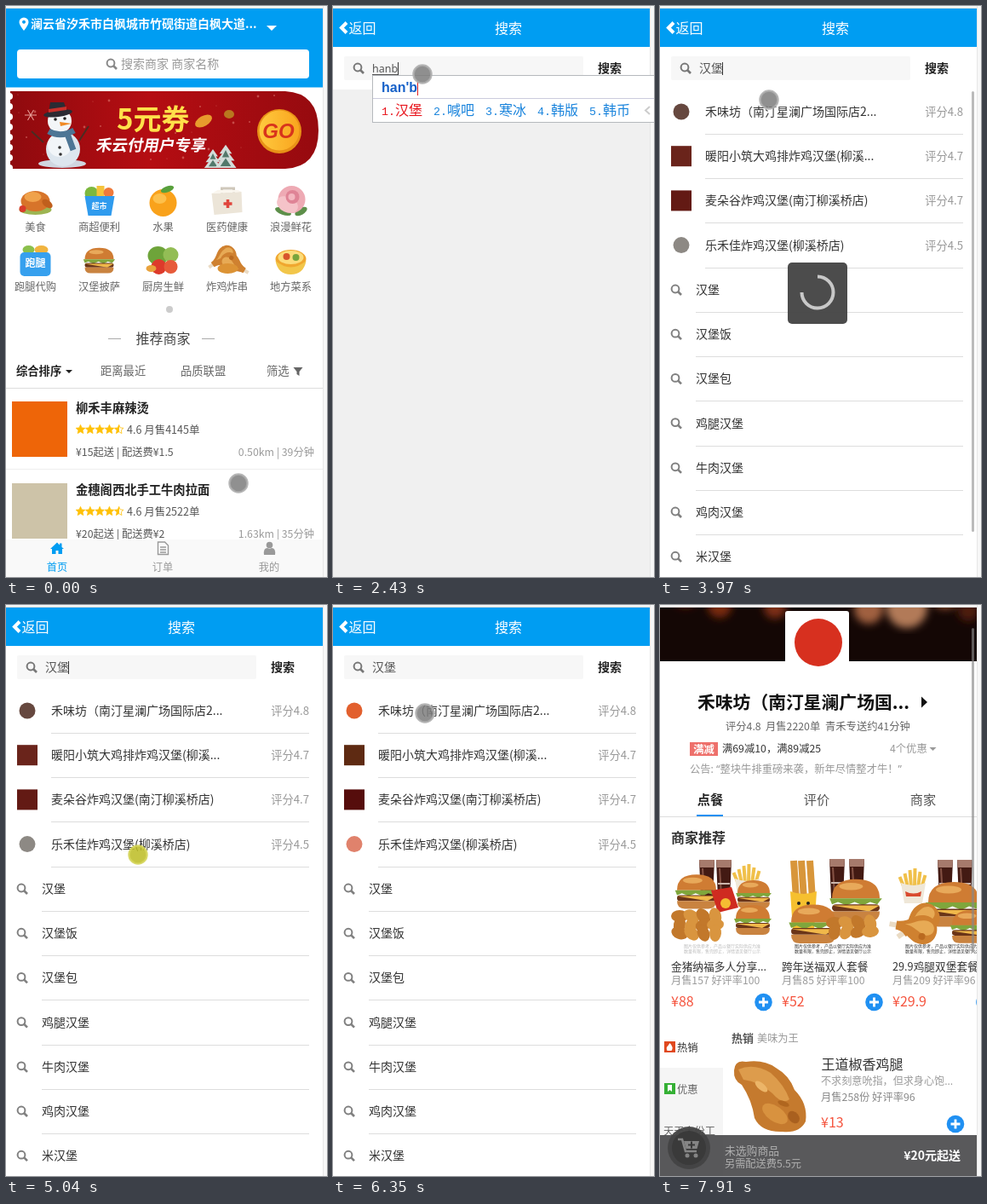
An HTML page for the animation above (7990 ms loop, 377 by 670 pixels).

```html
<!DOCTYPE html>
<html lang="zh-CN">
<head>
<meta charset="utf-8">
<style>
html, body { margin: 0; width: 100%; height: 100%; overflow: hidden; background: #fff; }
svg { display: block; width: 377px; height: 670px; font-family: "Noto Sans CJK SC", "Noto Sans CJK", "Noto Sans", sans-serif; }
.latin { font-family: "Noto Sans", "Noto Sans CJK SC", sans-serif; }
.arial { font-family: "Liberation Sans", sans-serif; }
.mono { font-family: "Liberation Mono", monospace; }
</style>
</head>
<body>
<svg id="stage" viewBox="0 0 377 670"></svg>
<script>
const LOOP = 7990, TICK = LOOP / 104;
const BLUE = '#009df2', BOLD = 'font-weight="700"', MID = 'text-anchor="middle"', END = 'text-anchor="end"';
const $ = id => document.getElementById(id);

// Drawing helpers
const text = (x, y, size, fill, str, more = '') => `<text x="${x}" y="${y}" font-size="${size}" fill="${fill}" ${more}>${str}</text>`;
const rect = (x, y, w, h, fill, more = '') => `<rect x="${x}" y="${y}" width="${w}" height="${h}" fill="${fill}" ${more}/>`;
const circle = (x, y, r, fill, more = '') => `<circle cx="${x}" cy="${y}" r="${r}" fill="${fill}" ${more}/>`;
const oval = (x, y, rx, ry, fill, turn = 0) => `<ellipse rx="${rx}" ry="${ry}" fill="${fill}" transform="translate(${x} ${y}) rotate(${turn})"/>`;
const path = (d, fill, more = '') => `<path d="${d}" fill="${fill}" ${more}/>`;
const line = (d, color, width, more = '') => path(d, 'none', `stroke="${color}" stroke-width="${width}" ${more}`);
const group = (id, body, more = '') => `<g id="${id}" ${more}>${body}</g>`;
const at = (x, y, body, scale = 1) => `<g transform="translate(${x} ${y}) scale(${scale})">${body}</g>`;
const each = (list, fn) => list.map(fn).join('');

const magnifier = (x, y, color) => circle(x - 1, y - 1, 4.4, 'none', `stroke="${color}" stroke-width="2"`) + line(`M${x + 2} ${y + 2}l4 4`, color, 2.6);
const down = (x, y, w, color) => path(`M${x - w / 2} ${y}h${w}l${-w / 2} ${w / 2}z`, color);
const plus = (x, y) => circle(x, y, 10.3, '#2090f2') + line(`M${x - 5.5} ${y}h11M${x} ${y - 5.5}v11`, '#fff', 2.8);
const back = (x, y, s) => line(`M${x + s} ${y - s}l${-s} ${s}l${s} ${s}`, '#fff', 4);

function star(x, y, fill) {
  const points = Array.from({ length: 10 }, (_, i) => {
    const r = i % 2 ? 2.6 : 5.6, a = i * Math.PI / 5;
    return [x + r * Math.sin(a), y - r * Math.cos(a)].map(v => v.toFixed(1));
  });
  return `<polygon points="${points.join(' ')}" fill="${fill}" stroke="#ffc107" stroke-width=".8"/>`;
}

// Food
const burger = (x, y, s) => at(x, y, path('M-20 -2Q-20 -18 0 -18T20 -2z', '#cf7c33') + oval(-4, -12, 10, 3, '#e8a95a') +
  path('M-22 -2h44l-4 5l-6 -2l-6 3l-7 -3l-7 3l-7 -3l-5 2z', '#7fa63c') + rect(-20, 3, 40, 6, '#6b3518', 'rx="3"') +
  path('M-20 4h40l-9 5z', '#f0b84a') + path('M-20 9h40q0 8 -8 8h-24q-8 0 -8 -8', '#c98340'), s);
const cola = (x, y) => at(x, y, path('M-9 -24h18l-2 46h-14z', '#431a13') + path('M-9 -24h18l-.6 9h-16.8z', '#a67a6c') +
  line('M-5 -14l2 32', '#855244', 2) + line('M-7 4h14', '#cbb5ac', 2));
const fries = (x, y) => at(x, y, each([-11, -7, -3, 1, 5, 9], i => line(`M${i} 4L${i * 1.5} ${-20 + Math.abs(i)}`, '#f0c04a', 4)) +
  path('M-15 -2q15 6 29 0l-4 24h-21z', '#efe7d8') + path('M-10 8q10 5 19 0l-1 6h-17z', '#d94a2f'));
const nuggets = (x, y, n) => at(x, y, each([...Array(n).keys()], i => oval((i % 4) * 14 - 20, (i >> 2) * 10, 10, 7, i % 2 ? '#d9953f' : '#c2782b', i * 25)));
const drum = (x, y, s, turn) => `<g transform="translate(${x} ${y}) rotate(${turn}) scale(${s})">` +
  line('M0 14V34', '#eadbc4', 6) + path('M-17 -6C-17 -28 17 -28 17 -6C17 8 6 10 5 26H-5C-6 10 -17 8 -17 -6', '#cf8130') +
  path('M-11 -8C-11 -22 6 -22 6 -10C4 0 -2 4 -3 16C-6 4 -11 2 -11 -8', '#e7aa55') + circle(8, -6, 4, '#ba6a20') + '</g>';
const friedLeg = path('M87 583Q88 570 101 573Q122 570 136 580Q152 589 158 606Q174 622 171 643Q164 657 144 655Q119 656 111 639Q108 618 96 600Q86 595 87 583', '#c57a2e') +
  path('M92 582Q110 574 130 586Q146 600 152 617Q144 624 132 610Q116 596 98 594z', '#dd9c4c') +
  oval(135, 634, 17, 9, '#d8923f', 35) + oval(157, 638, 8, 6, '#a9601f', 50) + oval(119, 602, 9, 4, '#ecb568', 40) + oval(145, 622, 7, 3, '#b0661f', 20);

const foodIcons = [
  ['美食', oval(0, 10, 19, 6, '#9db552') + oval(0, 0, 17, 12, '#d7742a') + oval(-3, -5, 10, 6, '#f0a24b') + oval(14, 3, 7, 4, '#c05f1c', 35) + circle(-15, 9, 4, '#d93c2b')],
  ['商超便利', oval(-9, -9, 8, 8, '#7cb83f') + rect(-3, -18, 9, 14, '#f5c33b') + circle(11, -10, 6, '#ef7a3b') + path('M-17 -6H18L14 17H-13z', '#2f9bee') + text(0, 9, 9, '#fff', '超市', MID + BOLD)],
  ['水果', circle(0, 2, 16, '#f9a21b') + oval(-4, -3, 8, 6, '#fdc04b') + oval(5, -14, 8, 3.5, '#58a03c', -20)],
  ['医药健康', line('M-6 -9v-6h14v6', '#cfc8bb', 3) + path('M-18 -9L17 -11L18 13L-15 16z', '#ece5d8') + path('M-18 -9l7 -4h24l4 2z', '#faf6ee') + line('M-4 3h10M1 -2v10', '#e0453c', 3.5)],
  ['浪漫鲜花', oval(-9, 12, 10, 4, '#5d8f4a', 20) + oval(12, 12, 8, 4, '#5d8f4a', -30) + circle(1, -2, 16, '#eeaab4') + oval(-4, 4, 13, 9, '#f5c3c9', 25) + circle(2, -5, 8, '#df8496') + circle(1, -5, 4, '#f3b7c0')],
  ['跑腿代购', oval(-8, -13, 7, 5, '#8bc04c') + oval(7, -13, 8, 5, '#f1b43f') + rect(-18, -10, 36, 28, '#36a0ee', 'rx="5"') + text(0, 7, 12, '#fff', '跑腿', MID + BOLD)],
  ['汉堡披萨', burger(0, 0, .85)],
  ['厨房生鲜', oval(-6, -6, 12, 11, '#6ea43a') + oval(9, -7, 9, 9, '#93bd55') + circle(-5, 7, 9, '#dd3a2b') + circle(9, 7, 8, '#e75a3a') + oval(-14, 9, 6, 4, '#e9a33d')],
  ['炸鸡炸串', drum(-3, -5, .65, 55) + drum(6, 3, .65, -60) + oval(1, 9, 12, 6, '#dc9335')],
  ['地方菜系', oval(0, -2, 18, 11, '#f0a72f') + oval(0, -4, 15, 8, '#fbdc7b') + circle(-5, -5, 4, '#d8542c') + circle(6, -4, 4, '#79a53c') + path('M-18 0Q0 15 18 0Q15 16 0 16T-18 0', '#f2c64a')],
];

// Home page
const banner = () => path('M5 100H328Q367 102 367 145.500T328 191H5z', 'url(#red)') +
  each([...Array(8).keys()], i => circle(4, 106 + i * 12, 4, '#fff')) +
  each([...Array(34).keys()], i => circle(14 + i * 97 % 320, 104 + i * 37 % 80, .6 + i % 3 * .4, '#e78b80', 'opacity=".5"')) +
  each([0, 60, 120], a => `<path d="M22 128h14" stroke="#e9a49c" transform="rotate(${a} 29 128)"/>`) +
  oval(66, 185, 28, 5, '#d0d6e0') + circle(67, 168, 20, '#dde6ee') + circle(63, 163, 14, '#f1f5f8') + circle(63, 135, 14, '#f3f6f8') +
  line('M44 160L30 147M86 158L97 141', '#4a2c22', 2) + oval(61, 126, 17, 4, '#2b2b33', -8) + path('M50 125l2 -12h16l4 11z', '#2b2b33') + path('M50 121l21 -3v4l-21 3z', '#c9302b') +
  circle(58, 133, 1.8, '#222') + circle(69, 132, 1.8, '#222') + path('M63 136l14 2l-13 3z', '#f08a24') +
  line('M50 147Q64 155 80 146M72 150l7 19', '#4d7695', 7) + circle(63, 166, 1.8, '#333') + circle(64, 174, 1.8, '#333') +
  text(130, 145, 33, '#ffe04a', '5元券', BOLD) + text(105, 170, 18.5, '#fff', '禾云付用户专享', BOLD + ' transform="skewX(-10)" transform-origin="105 170"') +
  oval(232, 135, 11, 6, '#e89b2d', -30) + oval(262, 127, 6, 5, '#b9781f') +
  each([[243, 190, .85], [258, 190, 1.05]], ([x, y, s]) => at(x, y, path('M0 -26l7 10h-3l6 8h-4l6 8h-24l6 -8h-4l6 -8h-3z', '#d3dcd9') + path('M0 -20l4 8h-8zM0 -11l6 9h-12z', '#53786b'), s)) +
  circle(321, 147, 26, '#e89117') + circle(321, 146, 23.5, 'url(#gold)') + text(320, 155, 24, '#d8341c', 'GO', `${MID} ${BOLD} class="arial" font-style="italic"`);

const shop = (y, color, name, sales, fee, distance) => rect(7, y, 65, 65, color) + text(82, y + 13, 14.3, '#222', name, BOLD) +
  each([0, 1, 2, 3, 4], i => star(87.5 + i * 11.3, y + 33, i < 4 ? '#ffc107' : 'url(#half)')) +
  text(142, y + 38, 12.5, '#555', `4.6 月售${sales}单`) + text(82, y + 63.5, 12.3, '#555', fee) + text(362, y + 63.5, 12.3, '#999', distance, END);

const home = rect(0, 3, 372, 667, '#fff') + rect(0, 3, 372, 92.5, BLUE) +
  path('M21 29Q15.500 22 15.500 19A5.500 5.500 0 0 1 26.500 19Q26.500 22 21 29M21 16.800a2 2 0 1 0 .01 0', '#fff', 'fill-rule="evenodd"') +
  text(29, 26, 14, '#fff', '澜云省汐禾市白枫城市竹砚街道白枫大道...', BOLD) + down(312, 23, 12, '#fff') +
  rect(13, 51, 343, 34, '#fff', 'rx="4"') + magnifier(124, 68, '#888') + text(135, 73, 14, '#999', '搜索商家 商家名称') + banner() +
  each(foodIcons, ([label, art], i) => {
    const x = 34.5 + i % 5 * 75, y = i < 5 ? 229 : 299;
    return at(x, y, art) + text(x, y + 34.5, 12.3, '#666', label, MID);
  }) +
  circle(192, 356, 4, '#ccc') + text(184.5, 396, 16, '#444', '推荐商家', MID) + line('M120 390.500h15M230 390.500h15', '#aaa', 1) +
  text(12, 433, 13.3, '#222', '综合排序', BOLD) + down(74, 427, 8, '#222') + text(111, 433, 13.3, '#666', '距离最近') + text(205, 433, 13.3, '#666', '品质联盟') +
  text(306, 433, 13.3, '#666', '筛选') + path('M337.500 424h11l-4 5v5l-3 -2v-3z', '#666') + rect(0, 448, 372, 1, '#ddd') +
  shop(464, '#ee6508', '柳禾丰麻辣烫', 4145, '¥15起送 | 配送费¥1.5', '0.50km | 39分钟') + rect(0, 543, 372, 1, '#eee') +
  shop(560, '#cdc3a8', '金穗阁西北手工牛肉拉面', 2522, '¥20起送 | 配送费¥2', '1.63km | 35分钟') +
  rect(0, 626, 372, 44, '#f9f9f9') + path('M52 637l8 -7.500l3 3v-2h2.500v4.500l2.500 2h-2v6h-4.500v-4h-3v4h-4.500v-6z', BLUE) +
  line('M178.500 629h8l4 4v10.500h-12zM181 635h7M181 638h7M181 641h7', '#999', 1.4) + circle(309.5, 632.500, 3.800, '#999') + path('M303 644q-1 -8 4 -8q2.500 1.500 5 0q5 0 4 8z', '#999') +
  text(60, 663, 12.2, BLUE, '首页', MID) + text(184, 663, 12.2, '#999', '订单', MID) + text(309, 663, 12.2, '#999', '我的', MID);

// Search page
const ROW = 52.2;
const stores = [['禾味坊（南汀星澜广场国际店2...', 4.8], ['暖阳小筑大鸡排炸鸡汉堡(柳溪...', 4.7], ['麦朵谷炸鸡汉堡(南汀柳溪桥店)', 4.7], ['乐禾佳炸鸡汉堡(柳溪桥店)', 4.5]];
const words = ['汉堡', '汉堡饭', '汉堡包', '鸡腿汉堡', '牛肉汉堡', '鸡肉汉堡', '米汉堡', '香辣汉堡'];
const logos = colors => each(colors, (c, i) => i % 3 ? rect(13, 112 + i * ROW, 24, 24, c) : circle(25, 124 + i * ROW, 9.5, c));

const list = rect(0, 98, 372, 700, '#fff') +
  group('dull', logos(['#66483f', '#6a241b', '#631a14', '#8d8984'])) + group('vivid', logos(['#e2602e', '#5e2a12', '#560d0c', '#e0826c'])) +
  each(stores, ([name, score], i) => text(53, 129 + i * ROW, 14, '#333', name) + text(356, 129 + i * ROW, 13.2, '#999', '评分' + score, END) + rect(53, Math.round(150 + i * ROW), 303, 1, '#ddd')) +
  each(words, (w, i) => magnifier(19, 333 + i * ROW, '#808080') + text(42, 338 + i * ROW, 14, '#333', w) + rect(42, Math.round(359 + i * ROW), 314, 1, '#ddd'));

const search = rect(0, 3, 372, 667, '#f0f0f0') + rect(0, 3, 372, 45, BLUE) + back(10, 25.5, 6) + text(18.5, 32, 16, '#fff', '返回') + text(206, 32, 16, '#fff', '搜索', MID) +
  rect(0, 48, 372, 50, '#fff') + rect(13, 59, 281, 28, '#f7f7f7', 'rx="2"') + magnifier(30, 73, '#777') + text(311, 78, 14, '#222', '搜索', BOLD) +
  group('results', `<g clip-path="url(#listArea)">${group('list', list)}</g>` + rect(366, 100, 3, 517, '#bbb', 'id="listBar" rx="1.5"')) +
  text(46, 78, 14, '#555', '', 'id="query"') + rect(46, 80, 0, 1, '#555', 'id="underline"') + rect(46, 66, 1, 15, '#333', 'id="caret"');

const ime = rect(46.5, 81.5, 340, 55, '#fff', 'stroke="#b5b9bd"') + rect(47, 108, 330, 1, '#ccd') +
  text(57, 101, 16, '#1560c8', '', `id="pinyin" class="arial" ${BOLD}`) + rect(100, 87, 1, 18, '#e02020', 'id="imeCaret"') +
  each([0, 1, 2, 3, 4], i => {
    const x = 57 + i * 61, color = i ? '#1883dc' : '#e8141c';
    return text(x, 128, 13.3, color, `${i + 1}.`, 'class="mono"') + text(x + 16, 128, 16, color, '', `id="word${i}" font-weight="300"`);
  }) + line('M372 118l-5 4.500l5 4.500', '#ccc', 2);

const typing = [
  [2190, 'ha', 'ha', '哈 蛤 铪 嘿 呵'], [2260, 'han', 'han', '汉 喊 韩 寒 含'], [2430, 'hanb', "han'b", '汉堡 喊吧 寒冰 韩版 韩币'],
  [2500, 'hanba', "han'ba", '喊吧 汉堡 汗吧 旱坝 寒坝'], [2580, 'hanbao', "han'bao", '汉堡 憨包 含苞 韩宝 寒豹'],
];

// Shop page
const meals = [
  ['金猪纳福多人分享...', '月售157 好评率100', '¥88', cola(42, 33) + cola(62, 33) + burger(30, 47, 1.15) + fries(90, 33) + burger(97, 50, .95) + burger(96, 80, 1) + at(61, 60, path('M-14 -15l24 -4l8 24l-24 6z', '#cf2b20') + circle(3, 0, 6, '#f5bd32')) + nuggets(30, 75, 12), '#bbb'],
  ['跨年送福双人套餐', '月售85 好评率100', '¥52', cola(65, 32) + cola(88, 32) + each([14, 23, 33], x => line(`M${x} 10l3 45`, '#d8963a', 8)) + path('M10 46q16 6 31 0l-3 46h-25z', '#f6c02f') + circle(20, 60, 2, '#222') + circle(31, 60, 2, '#222') + path('M22 66h8l-4 7z', '#d73a22') + burger(87, 57, 1.4) + burger(37, 85, 1.3) + nuggets(82, 83, 8), '#333'],
  ['29.9鸡腿双堡套餐', '月售209 好评率96', '¥29.9', cola(62, 33) + cola(85, 33) + fries(25, 38) + burger(72, 62, 1.5) + drum(34, 80, 1, 55) + drum(30, 90, 1, 100) + burger(92, 88, 1.1), '#333'],
];
const meal = ([name, stats, price, art, ink], i) => {
  const x = 13 + i * 130;
  return at(x, 327, art + text(60, 112, 5, ink, '图片仅供参考，产品以餐厅实际供应为准', MID) + text(60, 118, 5, ink, '数量有限，售完即止，详情请见餐厅公示', MID)) +
    text(x, 465.5, 12.7, '#333', name) + text(x, 482, 12.2, '#999', stats) + text(x, 508, 16, '#f5533d', price) + plus(x + 108.5, 503);
};
const glows = [
  [30, 22, 18, '#5a1a0c'], [70, 38, 14, '#7a2a10'], [62, 12, 12, '#b0522a'], [110, 16, 15, '#c0602a'], [135, 40, 13, '#7d2e14'], [168, 14, 16, '#a84a22'],
  [215, 20, 15, '#8a351a'], [245, 42, 17, '#a0613f'], [290, 40, 24, '#b27a58'], [275, 14, 14, '#7a3018'], [335, 24, 18, '#8a4a2c'], [362, 44, 12, '#4e1a0e'],
];

const store = rect(0, 3, 372, 760, '#fff') + rect(0, 3, 372, 100, '#140705') +
  `<g clip-path="url(#photo)"><g filter="url(#blur)">${each(glows, ([x, y, r, color]) => circle(x, y, r, color))}</g></g>` + back(5, 17, 8) +
  rect(147, 44, 75, 78, '#fff', 'rx="3"') + circle(186, 81, 28, '#d7301f') +
  text(44, 159, 20.8, '#111', '禾味坊（南汀星澜广场国...', BOLD) + path('M307 144.500l7 6.500l-7 6.500z', '#111') +
  text(77, 184, 12.3, '#666', '评分4.8') + text(124, 184, 12.3, '#666', '月售2220单') + text(194, 184, 12.3, '#666', '青禾专送约41分钟') +
  rect(35, 198, 33, 16, '#ee706b') + text(51.5, 210.5, 12.3, '#fff', '满减', MID + BOLD) + text(73, 210, 12.3, '#333', '满69减10，满89减25') +
  text(270, 210, 12.3, '#999', '4个优惠') + down(320.5, 204, 8, '#999') + text(35, 234, 12.3, '#999', '公告: “整块牛排重磅来袭，新年尽情整才牛！”', 'class="latin"') +
  text(59, 271, 15.2, '#222', '点餐', MID + BOLD) + text(184, 271, 15.2, '#555', '评价', MID) + text(309, 271, 15.2, '#555', '商家', MID) +
  rect(0, 285, 372, 1, '#ddd') + rect(43, 283, 31, 2, '#2090f2') + text(13, 316, 16, '#333', '商家推荐', BOLD) + each(meals, meal) +
  rect(0, 580, 74, 180, '#f5f5f5') + rect(5, 549, 13, 13, '#e0491f') + path('M11.500 551q5 5 2 9h-5q-2 -4 1 -6z', '#fff') + text(20, 560.5, 12.3, '#333', '热销') +
  rect(5, 598, 13, 13, '#35b035') + path('M9 600h5v8l-2.500 -2l-2.500 2z', '#fff') + text(20, 609.5, 12.3, '#666', '优惠') + text(4, 658.5, 12.2, '#666', '天天大份工') +
  text(84, 549.5, 13, '#555', '热销', BOLD) + text(114, 549.5, 12.2, '#999', '美味为王') + friedLeg +
  text(189.5, 582, 16, '#333', '王道椒香鸡腿', 'font-weight="500"') + text(189, 600, 12.1, '#999', '不求刻意吮指，但求身心饱...') + text(189, 619, 12.3, '#888', '月售258份 好评率96') +
  text(189, 650, 16, '#f5533d', '¥13') + plus(347, 646);

const basket = rect(0, 622, 372, 48, '#4b4b4e', 'opacity=".92"') + circle(34, 637, 25, '#444', 'opacity=".95"') + circle(34, 637, 20, '#3a3a3a') +
  line('M21 627h5l4 14h13', '#858585', 2.6) + path('M28 629h18l-2.500 9h-13z', '#858585') + line('M33 633.500h8M37 629.500v8', '#3a3a3a', 2) + circle(32, 646, 2.5, '#858585') + circle(42, 646, 2.5, '#858585') +
  text(76, 645, 12.8, '#b0b0b0', '未选购商品') + text(76, 660, 12.2, '#b0b0b0', '另需配送费5.5元') + text(353, 651, 14, '#fff', '¥20元起送', END + BOLD);

const clip = (id, x, y, w, h) => `<clipPath id="${id}">${rect(x, y, w, h, '#000')}</clipPath>`;
const gradient = (id, ...stops) => `<linearGradient id="${id}">${each(stops, ([o, c]) => `<stop offset="${o}" stop-color="${c}"/>`)}</linearGradient>`;

$('stage').innerHTML = `<defs>${clip('page', 0, 3, 372, 667)}${clip('listArea', 0, 98, 372, 572)}${clip('photo', 0, 3, 372, 100)}
  ${gradient('red', [0, '#8f0a0e'], [.45, '#b50d12'], [1, '#960a0f'])}${gradient('gold', [0, '#ffc93e'], [1, '#f9a51e'])}${gradient('half', [.5, '#ffc107'], [.5, '#fff'])}
  <filter id="blur"><feGaussianBlur stdDeviation="5"/></filter></defs>` +
  rect(0, 0, 377, 670, '#f7f7f7') + rect(0, 2, 372, 1, '#ddd') + rect(372, 0, 1, 670, '#e6e6e6') +
  `<g clip-path="url(#page)">${group('home', home)}${group('search', search)}${group('shop', group('store', store) + basket + rect(366, 3, 3, 381, '#888', 'id="shopBar" rx="1.5" opacity=".65"'))}</g>` +
  group('ime', ime) +
  group('spinner', rect(150, 301, 70, 72, '#454545', 'rx="5" opacity=".96"') + line('M185 317.500A18.500 18.500 0 1 1 166.500 336', '#c8c8c8', 4, 'id="arc"')) +
  group('cursor', circle(0, 0, 10.5, '#808080', 'id="dot" stroke-width="2.5" fill-opacity=".85" stroke-opacity=".85"'));

// Motion
const cursorKeys = [[0, 273, 560], [220, 108, 71], [390, 108, 71], [600, 106, 74], [980, 106, 74], [990, 105, 80], [2730, 105, 80], [3450, 128, 110], [4430, 128, 110],
  [4980, 155, 293], [5070, 155, 293], [5360, 150, 238], [5560, 150, 238], [5640, 150, 292], [5820, 150, 292], [6290, 108, 127], [6820, 108, 127], [7440, 181, 236], [7600, 181, 236], [7840, 181, 200]];
const listKeys = [[5070, 0], [5360, 54], [5560, 54], [5640, 0]];
const listBarKeys = [[4430, 1], [4700, 0], [5060, 0], [5100, 1], [5830, 1], [6150, 0]];
const shopKeys = [[7590, 0], [7900, 37]];
const presses = [[390, 550], [1170, 1240], [5000, 5360], [5560, 5660], [6670, 6830], [7600, 7840]];

function track(keys, t) {
  const next = keys.findIndex(k => k[0] > t);
  if (next < 0) return keys[keys.length - 1].slice(1);
  if (!next) return keys[0].slice(1);
  const a = keys[next - 1], b = keys[next], u = (t - a[0]) / (b[0] - a[0]);
  return a.slice(1).map((v, i) => v + (b[i + 1] - v) * u);
}
const show = (id, on) => $(id).style.display = on ? '' : 'none';
const move = (id, x, y) => $(id).setAttribute('transform', `translate(${x} ${y})`);
const set = (id, name, value) => $(id).setAttribute(name, value);

function render(t) {
  const tick = Math.floor((t + 16) / TICK) * TICK;

  show('home', t < 470);
  show('search', t >= 470 && t < 6750);
  show('shop', t >= 6750);
  show('results', t >= 3580);
  show('dull', t < 5580);
  show('vivid', t >= 5580);
  const [scroll] = track(listKeys, tick);
  move('list', 0, -scroll);
  move('listBar', 0, scroll * .9);
  set('listBar', 'opacity', track(listBarKeys, tick)[0]);

  const composing = t >= 2190 && t < 2730;
  const [, typed, pinyin, choices] = typing.filter(k => k[0] <= t).pop() || typing[0];
  show('ime', composing);
  const query = $('query');
  query.textContent = composing ? typed : t >= 2730 ? '汉堡' : '';
  query.setAttribute('class', composing ? 'latin' : '');
  query.setAttribute('font-size', composing ? 12.5 : 14);
  const width = query.textContent && t >= 470 && t < 6750 ? query.getComputedTextLength() : 0;
  set('underline', 'width', composing ? width : 0);
  set('caret', 'x', Math.round(46 + width - (composing || !width ? 0 : 1)));
  const blink = t < 2190 ? t >= 1240 && t < 1790 : Math.floor(Math.max(0, t - 2330) / 550) % 2 === 0;
  show('caret', blink);
  if (composing) {
    $('pinyin').textContent = pinyin;
    set('imeCaret', 'x', 57 + Math.round($('pinyin').getComputedTextLength()));
    choices.split(' ').forEach((word, i) => $('word' + i).textContent = word);
  }

  show('spinner', t >= 2810 && t < 4350);
  set('arc', 'transform', `rotate(${(tick - 3918) * .36} 185 336)`);

  const [offset] = track(shopKeys, tick);
  move('store', 0, -offset);
  move('shopBar', 0, offset * .65);
  show('shopBar', offset > 0);

  const pressed = presses.some(([from, to]) => t >= from && t < to);
  move('cursor', ...track(cursorKeys, tick));
  show('cursor', t < 7840);
  set('dot', 'fill', pressed ? '#bcbc22' : '#7d7d7d');
  set('dot', 'stroke', pressed ? '#d4d456' : '#adadad');
}

const start = performance.now();
function frame() {
  render((performance.now() - start) % LOOP);
  requestAnimationFrame(frame);
}
frame();
</script>
</body>
</html>
```
